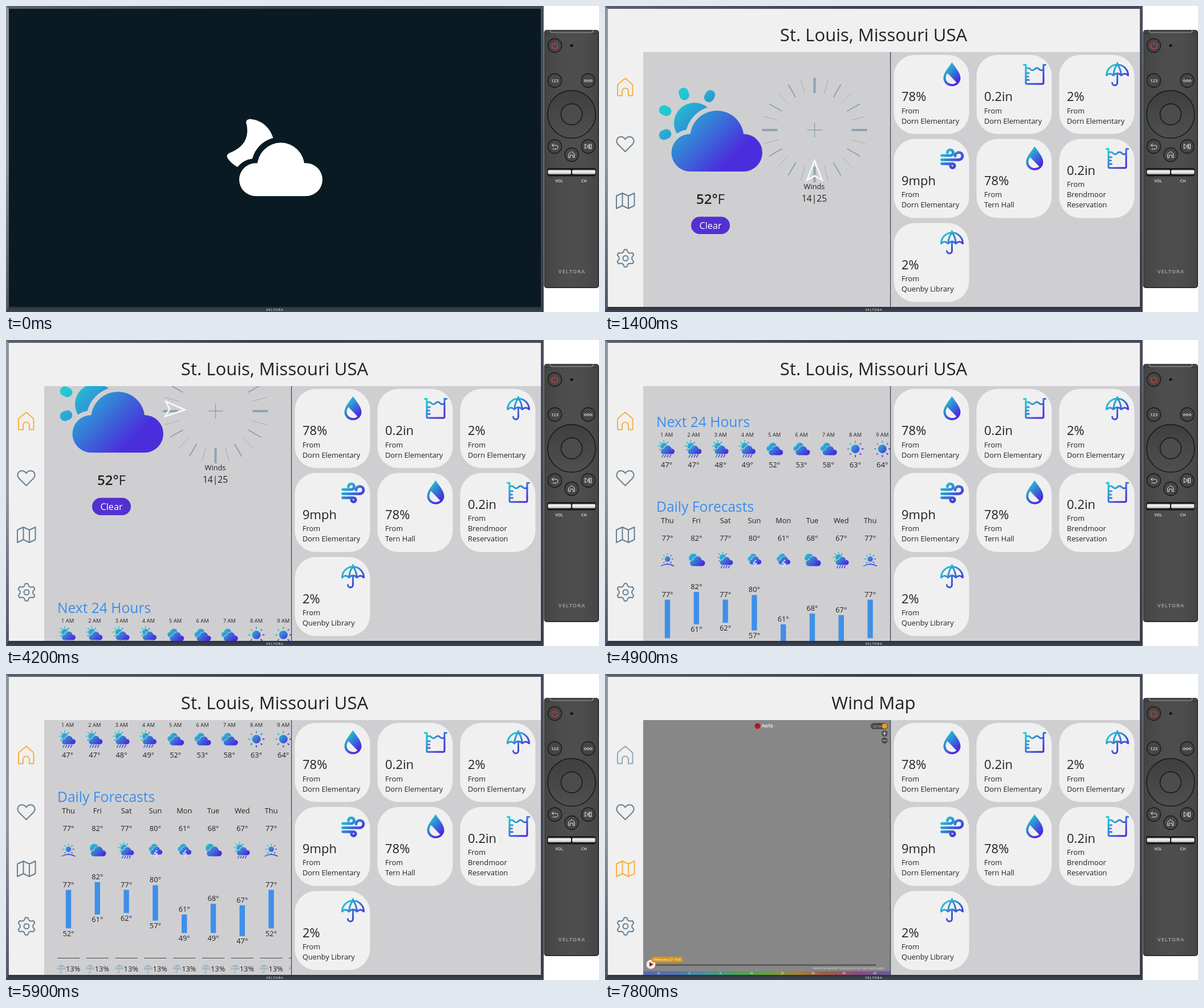
Write an HTML page with a canvas that moves like this. It is 1040 by 538 pixels and loops after 8000 ms.

```html
<!DOCTYPE html>
<html lang="en">
<head>
<meta charset="utf-8">
<title>Weather on TV</title>
<style>
html, body { margin: 0; width: 100%; height: 100%; overflow: hidden; background: #fff; }
canvas { display: block; width: 1040px; height: 538px; }
</style>
</head>
<body>
<canvas id="stage" width="1040" height="538"></canvas>
<script>
const ctx = document.getElementById('stage').getContext('2d');
const LOOP = 8000, STEP = 100;
const LIGHT = '#f0f0f0', PANEL = '#cfcfd2', INK = '#222', SLATE = '#667f92', ORANGE = '#f9b03f', BLUE = '#3b8eed';
const TAU = Math.PI * 2;
const BRAND = 'VELTORA';

// Drawing helpers
function rect(x, y, w, h, fill) {
  ctx.fillStyle = fill;
  ctx.fillRect(x, y, w, h);
}
function round(x, y, w, h, r, fill) {
  ctx.beginPath();
  ctx.roundRect(x, y, w, h, r);
  ctx.fillStyle = fill;
  ctx.fill();
}
function disc(x, y, r, fill, stroke, width = 1.3) {
  ctx.beginPath();
  ctx.arc(x, y, r, 0, TAU);
  if (fill) { ctx.fillStyle = fill; ctx.fill(); }
  if (stroke) { ctx.strokeStyle = stroke; ctx.lineWidth = width; ctx.stroke(); }
}
function trace(d, color, width) {
  ctx.strokeStyle = color;
  ctx.lineWidth = width;
  ctx.stroke(new Path2D(d));
}
function shape(d, color) {
  ctx.fillStyle = color;
  ctx.fill(new Path2D(d));
}
function text(s, x, y, size, color = INK, align = 'left', weight = 400, spacing = 0) {
  ctx.font = `${weight} ${size}px "Open Sans", "Noto Sans", sans-serif`;
  ctx.letterSpacing = spacing + 'px';
  ctx.textAlign = align;
  ctx.fillStyle = color;
  ctx.fillText(s, x, y);
}
function at(x, y, draw, scale = 1) {
  ctx.save();
  ctx.translate(x, y);
  ctx.scale(scale, scale);
  draw();
  ctx.restore();
}
function ramp(x0, y0, x1, y1, ...colors) {
  const g = ctx.createLinearGradient(x0, y0, x1, y1);
  colors.forEach((c, i) => g.addColorStop(i / (colors.length - 1), c));
  return g;
}
const tint = r => ramp(-r * 0.75, -r * 0.75, r * 0.6, r * 0.6, '#20cdd2', '#4a2edc');

// Weather icons
function cloud(x, y, w, h, fill, gap = 0) {
  const p = new Path2D(), low = h * 0.617, r = h * 0.44;
  p.roundRect(x, y + h - low, w, low, low / 2);
  const dome = new Path2D();
  dome.arc(x + w / 2, y + r, r, 0, TAU);
  p.addPath(dome);
  if (gap) { ctx.strokeStyle = PANEL; ctx.lineWidth = gap * 2; ctx.stroke(p); }
  ctx.fillStyle = fill;
  ctx.fill(p);
}
function rays(x, y, r0, r1, n, color, width) {
  ctx.strokeStyle = color;
  ctx.lineWidth = width;
  ctx.beginPath();
  for (let i = 0; i < n; i++) {
    const a = i / n * TAU;
    ctx.moveTo(x + r0 * Math.cos(a), y + r0 * Math.sin(a));
    ctx.lineTo(x + r1 * Math.cos(a), y + r1 * Math.sin(a));
  }
  ctx.stroke();
}
const sky = {
  rain() {
    const g = tint(14);
    disc(-5, -5, 6, g);
    rays(-5, -5, 8.2, 9.5, 8, g, 2);
    cloud(-10, -6, 24, 15, g, 1.2);
    for (let x = -6; x < 10; x += 4.5) trace(`M${x} 10.5l-2 4`, g, 1.6);
  },
  clouds() {
    const g = tint(14);
    cloud(-14, -11, 22, 15, g);
    cloud(-10, -5, 25, 16, g, 1);
  },
  sun() {
    const g = tint(14);
    disc(0, 0, 7.5, g);
    rays(0, 0, 11.5, 13.5, 8, g, 2);
  },
  partly() {
    const g = tint(16);
    disc(-6, -4, 8, g);
    cloud(-12, -7, 28, 18, g, 1.2);
  },
  dawn() {
    const g = tint(13);
    disc(0, -2, 5, g);
    rays(0, -2, 8, 10, 8, g, 1.6);
    trace('M-12 11Q0 4 12 11', g, 1.6);
  },
  storm() {
    const g = tint(13);
    cloud(-12, -12, 20, 14, g);
    cloud(-9, -7, 22, 15, g, 1);
    trace('M3 0L-2 6H4L0 12', '#eef', 1.6);
  }
};
function bigSky() {
  const g = ramp(122, 168, 222, 268, '#20cad2', '#4a2edc');
  ctx.lineCap = 'round';
  for (const [x, y] of [[138.5, 154.5], [183.5, 158.5], [105.5, 184], [105.5, 226]]) {
    const a = Math.atan2(y - 206, x - 157), dx = 2.5 * Math.cos(a), dy = 2.5 * Math.sin(a);
    trace(`M${x - dx} ${y - dy}L${x + dx} ${y + dy}`, g, 17);
  }
  disc(157, 206, 36, g);
  cloud(116.5, 184, 159.5, 107, g, 8);
}

// Tile icons, each centred in a 40 px box
const gauge = {
  drop() {
    shape('M0-21C5-13 15-3 15 7A15 14 0 0 1-15 7C-15-3-5-13 0-21Z', tint(18));
    shape('M-8-2L8 14.5A11.5 11 0 0 1-11 7C-11 3-10 1-8-2Z', LIGHT);
  },
  level() {
    trace('M-19-16.5H-15.5V15Q-15.5 17-13.5 17H13.5Q15.5 17 15.5 15V-16.5H19M-15.5-9Q-11.6-13-7.7-9T0-9T7.7-9T15.5-9M-15.5-2H-10M-15.5 4H-11M-15.5 10H-10', tint(20), 3);
  },
  umbrella(color = tint(20)) {
    trace('M-19 2A19 19 0 0 1 19 2Q13-4 7 2Q0-5-7 2Q-13-4-19 2M-7 2C-6-8-3-14 0-17C3-14 6-8 7 2M0-20V-17M0-1V15A4.5 4.5 0 0 1-9 15', color, 3);
  },
  wind() {
    trace('M-18-5H-3a5 5 0 1 0-5-5M-18 2.5H12a6.5 6.5 0 1 0-6.5-6.5M-18 9.5H1a3.7 3.7 0 1 1-3.7 3.7', tint(20), 4.8);
  }
};
const tiles = [
  ['78%', 'drop', 'Dorn Elementary'],
  ['0.2in', 'level', 'Dorn Elementary'],
  ['2%', 'umbrella', 'Dorn Elementary'],
  ['9mph', 'wind', 'Dorn Elementary'],
  ['78%', 'drop', 'Tern Hall'],
  ['0.2in', 'level', 'Brendmoor', 'Reservation'],
  ['2%', 'umbrella', 'Quenby Library']
];
function drawTiles(icons) {
  tiles.forEach(([value, icon, ...place], i) => {
    const x = 506.5 + (i % 3) * 145, y = 86 + Math.floor(i / 3) * 147.8;
    round(x, y, 132, 139, 37, LIGHT);
    const top = y + 120.5 - place.length * 18;
    text(value, x + 13.5, top - 21.5, 22);
    ['From', ...place].forEach((s, k) => text(s, x + 13.5, top + k * 18, 12.8));
    if (icons) at(x + 102, y + 34, () => gauge[icon]());
  });
}

// Sidebar
function gearPath() {
  let d = '';
  for (let i = 0; i < 24; i++) {
    const a = (i - 0.5) / 24 * TAU, r = i % 4 < 2 ? 15.5 : 11.3;
    d += `${i ? 'L' : 'M'}${36 + r * Math.sin(a)} ${443.5 - r * Math.cos(a)}`;
  }
  return d + 'ZM40.5 443.5a4.5 4.5 0 1 1-9 0a4.5 4.5 0 1 1 9 0Z';
}
const GEAR = gearPath();
function drawSidebar(homeColor, mapColor) {
  trace('M35.5 127L47 137Q48.5 138.5 48.5 140V157.5H41V150A5.5 5.5 0 0 0 30 150V157.5H22V140Q22 138.5 23.5 137Z', homeColor, 2);
  trace('M35.5 256L23 243.5C18 238 21 230 28 230C32 230 34 232 35.5 234.5C37 232 39 230 43 230C50 230 53 238 48 243.5Z', SLATE, 2);
  trace('M20 334L30.5 329L41 334L51.5 329V351L41 356L30.5 351L20 356ZM30.5 329V351M41 334V356', mapColor, 2);
  trace(GEAR, SLATE, 2);
}

// Left panel: current weather and forecasts
function drawCompass(turn) {
  const tick = '#8ca4b2';
  at(367.5, 218, () => {
    ctx.lineCap = 'butt';
    rays(0, 0, 66, 92, 24, tick, 0.8);
    rays(0, 0, 66, 92, 12, tick, 2);
    rays(0, 0, 65, 92, 4, tick, 4);
    trace('M-13 0H13M0-13V13', tick, 1.5);
    ctx.rotate(turn * Math.PI / 180);
    ctx.lineJoin = 'miter';
    trace('M0 54L13.2 88L0 80.5L-13.2 88Z', '#fafafa', 2.6);
  });
  text('Winds', 367, 322, 12.8, INK, 'center');
  text('14|25', 367, 344, 15.5, INK, 'center');
}
const hours = [[47, 'rain'], [47, 'rain'], [48, 'rain'], [49, 'rain'], [52, 'clouds'], [53, 'clouds'], [58, 'clouds'], [63, 'sun'], [64, 'sun']];
const days = [
  ['Thu', 77, 52, 'dawn'], ['Fri', 82, 61, 'partly'], ['Sat', 77, 62, 'rain'], ['Sun', 80, 57, 'storm'],
  ['Mon', 61, 49, 'storm'], ['Tue', 68, 49, 'partly'], ['Wed', 67, 47, 'rain'], ['Thu', 77, 52, 'dawn'], ['Fri', 82, 61, 'partly']
];
const barY = temp => 456.5 + (77 - temp) * 2.71;
function drawForecasts() {
  text('Next 24 Hours', 90, 153, 24.6, BLUE);
  hours.forEach(([temp, icon], i) => {
    const x = 108 + i * 47.3;
    text(`${i + 1} AM`, x, 170, 9.4, INK, 'center');
    at(x, 191.5, sky[icon]);
    text(temp + '°', x, 223.5, 12.8, INK, 'center');
  });
  text('Daily Forecasts', 90, 302, 24.6, BLUE);
  days.forEach(([day, high, low, icon], i) => {
    const x = 109.5 + i * 50.8, label = (s, y) => text(s, x, y, 12.8, INK, 'center');
    label(day, 322);
    label(high + '°', 353);
    at(x, 387, sky[icon], 0.95);
    label(high + '°', barY(high) - 5);
    rect(x - 4.7, barY(high), 9.4, barY(low) - barY(high), '#3f8fe9');
    label(low + '°', barY(low) + 13.5);
    rect(x - 19.5, 576, 39, 1, '#444');
    at(x - 12.5, 595.5, () => gauge.umbrella('#90abbd'), 0.36);
    text('13%', x - 4.5, 599.5, 12.8);
  });
}
function drawWeather(scroll, turn) {
  ctx.translate(0, -Math.round(scroll));
  bigSky();
  drawCompass(turn);
  text('52°', 160, 348, 24, INK, 'left', 600);
  text('F', 197.5, 348, 24);
  round(151, 370.5, 68, 30.5, 15.2, '#5230d2');
  text('Clear', 185, 392, 16.2, '#fff', 'center');
  ctx.translate(0, 420);
  ctx.lineCap = 'round';
  ctx.lineJoin = 'round';
  drawForecasts();
}

// Left panel: wind map
function drawMap(t) {
  if (t < 7400) return;
  rect(67, 81, 434, 448, '#878787');
  if (t < 7500) return;
  rect(67, 522.5, 434, 6.5, ramp(67, 0, 500, 0, '#5c67b6', '#5072b2', '#46929a', '#4aa25c', '#689f3b', '#a0823a', '#a3584f', '#8a4a84', '#6a5c9c'));
  ['kt', 0, 5, 10, 20, 30, 40, 60].forEach((s, i) => text(s, 94 + i * 54.2, 527.6, 5, '#fff', 'center'));
  rect(88, 510.5, 387, 2.5, '#555');
  disc(80.5, 510.5, 8, '#eee');
  shape('M78 506.5L85 510.5L78 514.5Z', '#9b1c1c');
  if (t < 7600) return;
  round(466, 86, 30, 11, 5.5, '#4a4a4a');
  text('22 m/s', 470, 93.7, 5.5, '#ccc');
  disc(490.5, 91.5, 4.6, '#e9a016');
  [104.5, 117].forEach(y => disc(490.3, y, 5.3, '#484848'));
  trace('M487.5 104.5h5.6M490.3 101.7v5.6M487.5 117h5.6', '#eee', 1.2);
  if (t < 7700) return;
  disc(267.5, 91.5, 5, '#b8141c');
  text('Aerlo', 274.5, 94.3, 8, '#fff', 'left', 600);
  text('. . .', 297, 94.3, 6, '#bbb');
  round(82, 497, 54, 10, 3, '#dc960f');
  text('Wednesday 27 - 9:00', 109, 503.8, 5, '#fff', 'center');
  text('Awesome weather forecasts on our own wind pages', 490, 518.5, 5.2, '#ddd', 'right');
}

// The screen at time t
function arrowTurn(t) {
  if (t < 3300) return 0;
  if (t < 3400) return 147;
  if (t < 3600) return 140;
  return t < 3900 ? 84 : 92.5;
}
const part = (t, from, to) => Math.min(1, Math.max(0, (t - from) / (to - from)));
function drawApp(t) {
  const onMap = t >= 6300;
  const p = 1 - (1 - part(t, 900, 1400)) ** 3;
  const scale = 0.968 + 0.032 * p;
  rect(5, 5, 933, 524, '#000');
  ctx.translate(471.5, 267);
  ctx.scale(scale, scale);
  ctx.translate(-471.5, -267);
  ctx.lineCap = ctx.lineJoin = 'round';
  rect(5, 5, 933, 524, LIGHT);
  rect(67, 81, 871, 448, PANEL);
  text(onMap ? 'Wind Map' : 'St. Louis, Missouri USA', 471, 62, 31.1, INK, 'center');
  drawSidebar(onMap ? '#91a8b8' : ORANGE, t >= 6700 ? ORANGE : SLATE);
  drawTiles(t >= 6700 || (t >= 1100 && !onMap));
  ctx.save();
  ctx.beginPath();
  ctx.rect(67, 81, 433, 448);
  ctx.clip();
  if (onMap) drawMap(t);
  else drawWeather(part(t, 4000, 4900) * 420 + part(t, 5000, 5900) * 77, arrowTurn(t));
  ctx.restore();
  rect(500, 81, 1.2, 448, '#35424e');
  if (p < 1) rect(5, 5, 933, 524, `rgba(0,0,0,${0.17 * (1 - p)})`);
}
function drawSplash() {
  rect(5, 5, 933, 524, '#091a22');
  cloud(409, 240.3, 146, 94, '#fff');
  shape('M422 208C419 202 424 198 430 199C449 201 463 214 468.5 232A51 51 0 0 0 432 268.5A39 39 0 0 0 406 283C400 280 393 274 389 268C386 263 388 260 393 258C415 249 427 234 422 208Z', '#fff');
}

// Television frame and remote
function drawFrame() {
  rect(0, 0, 943, 538, '#3a404c');
  shape('M0 0H943L938 5H5Z', ramp(0, 0, 943, 0, '#59606d', '#3b414e', '#454b58'));
  shape('M0 0L5 5V529L0 538Z', ramp(0, 0, 0, 538, '#8d939e', '#8f95a0', '#4f5562'));
  shape('M943 0L938 5V529L943 538Z', ramp(0, 0, 0, 538, '#4a505d', '#393e4a'));
  shape('M0 538L5 529H938L943 538Z', ramp(0, 529, 0, 538, '#2c323d', '#3f4653'));
  text(BRAND, 471.5, 536, 5.6, '#d5d8dd', 'center', 600, 0.8);
}
function drawRemote() {
  const black = '#161616', pale = '#e4e4e4';
  ctx.lineCap = ctx.lineJoin = 'round';
  round(943.5, 42, 96.5, 454, 5, '#2e2e2f');
  round(945, 43, 93.5, 451, 4, ramp(945, 0, 1038, 0, '#444445', '#4b4b4c', '#4e4e4f', '#4c4c4d', '#464647'));
  trace('M946 48H1038', '#303030', 1);
  trace('M955 42.5V45.5Q955 47 957 47H1027Q1029.5 47 1029.5 45V42.5', '#aaa', 1);
  for (const [x, y] of [[962.5, 69.5], [962.5, 131], [1021, 131], [962.5, 247], [992, 261.5], [1021, 247]]) {
    disc(x, y, 12, '#464647', black);
  }
  trace('M959.5 65.8A5.2 5.2 0 1 0 965.5 65.8M962.5 63.5V69', '#d8413f', 1.2);
  disc(992, 69.5, 2.5, '#111');
  text('123', 962.5, 133.8, 7.5, pale, 'center', 600);
  [1016, 1021, 1026].forEach(x => disc(x, 131.5, 1.8, null, pale, 1));
  disc(992, 190.5, 42, ramp(0, 148, 0, 233, '#3f3f40', '#4f4f50'), black, 1.5);
  disc(992, 190.5, 18.5, '#4c4c4d', black, 1.5);
  trace('M960.5 242L957.5 245L960.5 248M957.5 245H965Q968 245 968 248T965 251.5H959', pale, 1);
  trace('M987 260L992 256L997 260V266.5H994.5V262H989.5V266.5H987Z', pale, 1);
  trace('M1015.5 243V251L1021 247ZM1022 243V251M1024 243H1026.5V251H1024Z', pale, 1);
  round(949, 285, 85.5, 14.5, 4, '#1a1a1a');
  const silver = ramp(0, 287.5, 0, 296.5, '#8c8c8c', '#f6f6f6', '#dcdcdc', '#8c8c8c');
  round(950.5, 288, 40.5, 8, 2, silver);
  round(993, 288, 40.5, 8, 2, silver);
  text('VOL', 970, 310, 7, pale, 'center', 600);
  text('CH', 1013.7, 310, 7, pale, 'center', 600);
  text(BRAND, 992.5, 470.3, 9.2, '#98989a', 'center', 700, 0.9);
}

function draw(now) {
  const t = Math.floor((now % LOOP) / STEP) * STEP;
  rect(0, 0, 1040, 538, '#fff');
  drawFrame();
  ctx.save();
  ctx.beginPath();
  ctx.rect(5, 5, 933, 524);
  ctx.clip();
  if (t < 900) drawSplash();
  else drawApp(t);
  ctx.restore();
  drawRemote();
}
const start = performance.now();
function tick() {
  draw(performance.now() - start);
  requestAnimationFrame(tick);
}
tick();
</script>
</body>
</html>
```
